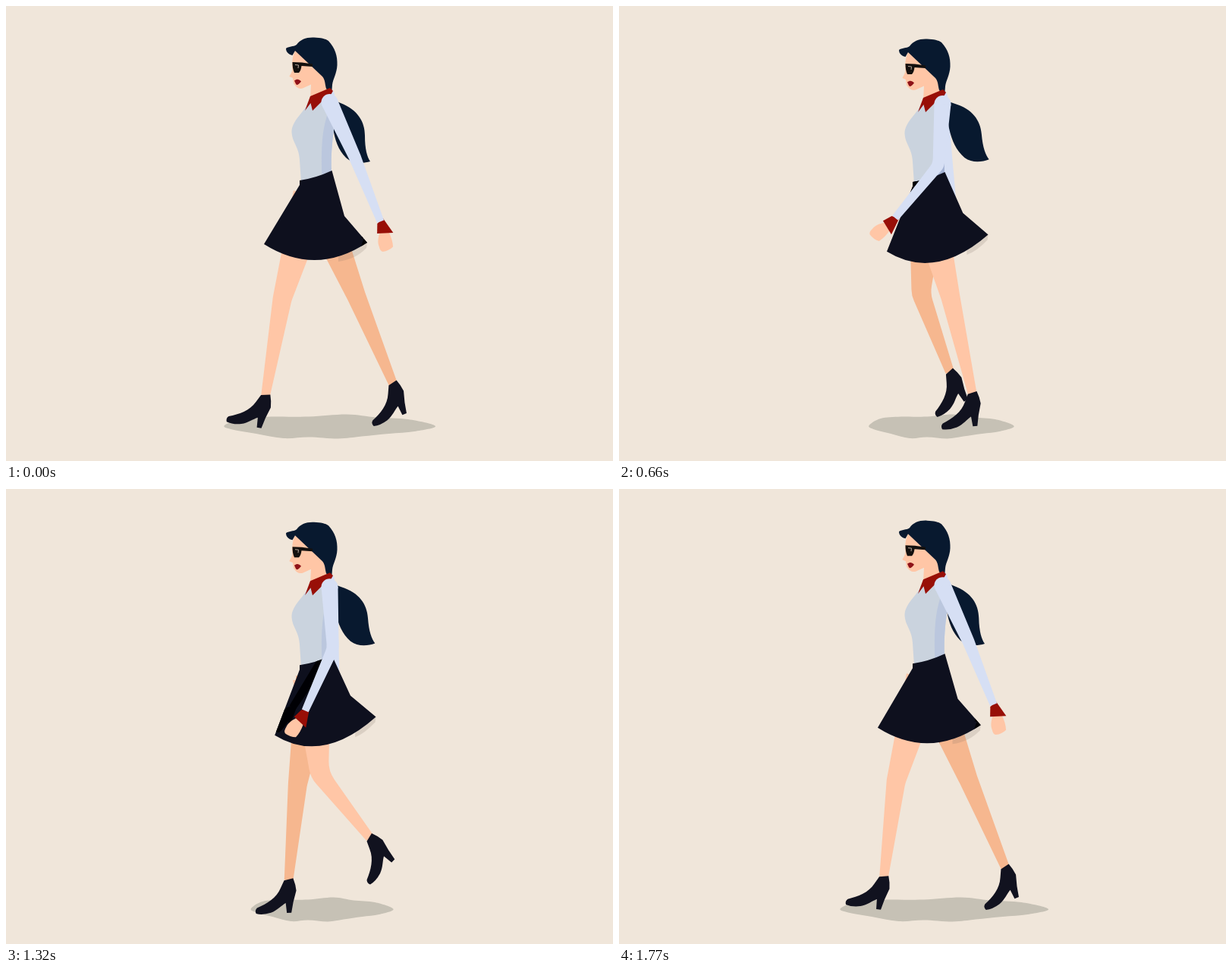
Animation of 800x600 px, one loop 1800 ms. Source, as an HTML page with a canvas:

```html
<!DOCTYPE html>
<html lang="en">
<head>
<meta charset="utf-8">
<title>Walk cycle</title>
<style>
html, body { margin: 0; width: 100%; height: 100%; overflow: hidden; background: #f0e6da; }
canvas { display: block; }
</style>
</head>
<body>
<canvas id="stage" width="800" height="600"></canvas>
<script>
const ctx = document.getElementById('stage').getContext('2d');
const LOOP = 1800, STEP = 30;
const C = {
  bg: '#f0e6da', ground: '#c6c1b5', skin: '#ffc6a6', farSkin: '#f6b78f', legShade: '#a87c66',
  skirt: '#0e101e', shoe: '#11121f', hair: '#08192f', shirt: '#cad3de', shirtBack: '#bbc7de',
  sleeve: '#d6dff4', sleeveShade: '#a3b2d3', red: '#980f07', lips: '#8f1218', glasses: '#14100e'
};

// Key rows: time, then values. Smooth periodic interpolation.
function track(period, keys) {
  const n = keys.length;
  const key = i => {
    const w = Math.floor(i / n);
    return [keys[i - w * n], keys[i - w * n][0] + w * period];
  };
  const slope = (i, c) => {
    const [a, ta] = key(i - 1), [b, tb] = key(i), [d, td] = key(i + 1);
    const h0 = tb - ta, h1 = td - tb;
    return ((b[c] - a[c]) / h0 * h1 + (d[c] - b[c]) / h1 * h0) / (h0 + h1);
  };
  return time => {
    const t = time % period;
    let i = n - 1;
    while (keys[i][0] > t) i--;
    const [a, ta] = key(i), [b, tb] = key(i + 1);
    const h = tb - ta, u = (t - ta) / h, u2 = u * u, u3 = u2 * u;
    return a.slice(1).map((v, j) =>
      v * (2 * u3 - 3 * u2 + 1) + b[j + 1] * (3 * u2 - 2 * u3) +
      h * (slope(i, j + 1) * (u3 - 2 * u2 + u) + slope(i + 1, j + 1) * (u3 - u2)));
  };
}

// knee x, y, ankle x, y, foot angle
const nearLeg = track(LOOP, [
  [0, 364, 386.5, 342, 514, 10], [120, 356, 388, 325, 519, 12], [240, 364, 392, 339, 517, 0],
  [480, 408, 384, 412, 514.5, 0], [700, 442, 384, 476, 509, -9], [870, 456, 380, 510, 492, -29],
  [990, 449, 377, 519, 467, -46], [1110, 438, 373, 511, 452, -54], [1290, 417, 376, 487, 457, -49],
  [1500, 391, 379, 421, 488, -25], [1650, 373, 383, 379, 505, -4], [1770, 365, 386, 349, 512, 8]
]);
const farLeg = track(LOOP, [
  [0, 461.5, 382, 510, 498, -22], [120, 455, 378, 519, 477, -37], [240, 448, 373, 517, 459, -47],
  [360, 437, 374, 511, 452, -53], [480, 424, 378, 497, 456, -52], [690, 394, 381, 426, 487, -26],
  [780, 383, 385, 399, 498, -10], [870, 376, 388, 375, 505, -2], [990, 368, 390, 347, 514, 10],
  [1110, 365, 392, 332, 519, 14.5], [1200, 368, 392, 340, 518, 3], [1500, 421, 386, 440, 512, -2],
  [1640, 447, 384, 482, 509, -8], [1770, 460, 382, 509, 499, -22]
]);
// upper arm angle, forearm angle (from straight down)
const nearArm = track(LOOP, [
  [0, 24.7, 21.7], [240, 20, 13.7], [480, 4.8, -21.6], [870, -10, -50], [960, -10.8, -51],
  [1110, -10.6, -46], [1500, 16.6, -1.8], [1770, 24.7, 21.7]
]);
const farArm = track(LOOP, [
  [0, -1, -10], [480, 3, -4], [870, 10, 18], [960, 10.3, 18], [1110, 9, 13.6], [1500, 3, -5]
]);
const skirtSway = track(900, [[0, 0], [210, .25], [240, .3], [480, 1], [600, .95], [870, .06]]);
const hairSway = track(900, [[0, 0], [210, .05], [240, .2], [480, .9], [600, 1], [870, .25]]);
const groundEnds = track(900, [
  [0, 288, 566], [90, 272, 569], [210, 258, 564], [240, 259, 558], [480, 338, 503],
  [600, 336, 510], [870, 292, 566]
]);

const shapes = {
  ponytail: new Path2D('M428 122 L441 128 C464 137 473 153 473 171 C473 189 476 199 480 205 C470 208 457 208 448 200 C438 190 433 176 431 160 Z'),
  hair: new Path2D('M369 56 C372 53 379 54 383 51 C388 44 396 41 406 41.500 C415 42 421 43 425 46 C434 56 437 66 436.500 78 C436 89 431 96 430 104 L429 116 L422 109 C420 102 421 98 417 93 L381 59 L377.500 65 C373 64 369 61 369 56 Z'),
  face: new Path2D('M382 57 C377 66 377 74 377.500 83 C377 88 374 91 373.500 93 L378 95 L379 102 C382 107 386 110 391 108.500 L402 103.500 L401 122 L424 113 L422 80 Z'),
  lips: new Path2D('M380 98.500 C383 96 386 96 389 99.500 C387 102 385 104 383 104 C381 102 381 100 380 98.500 Z'),
  glasses: new Path2D('M377.500 74 L390 74.500 L404 76.500 L404 80 L389.500 79 C389 83 388 86 386 88 L380 88 C378 84 377.500 79 377.500 74 Z'),
  glint: new Path2D('M381 77.500 L385.500 78 L385 82'),
  torso: new Path2D('M398 127 C393 141 377 150 376.500 166 C377 180 386 185 387 203 L389 233 L429 220 C428 195 430 180 432 163 L437 124 L422 114 Z'),
  torsoBack: new Path2D('M424 142 C417 162 415 185 416.500 224 L429 219 C428 195 430 180 432 163 L430 140 Z'),
  collar: new Path2D('M401 119 L427 108 L431 112 L428 117 L418 124 L404 138 L401.500 128 L394 138 Z'),
  shoe: new Path2D('M-6 0 L6 -2.500 Q9 6 9.500 14 L5 29 L2 43 L-4 43 L-5 30 C-11 33 -16 39 -25 42 Q-36 45 -44.500 42.500 Q-46.500 38 -43 35 C-30 30 -17 23 -11 10 Z'),
  cuff: new Path2D('M-5 1 L4.500 -3 L10 20 L-10 13 Z'),
  hand: new Path2D('M-7 14 C-11 19 -14 24 -14 30 Q-15 36 -12 38 Q-4 40 3 37 Q6 28 5 17 Z')
};

const groundShape = [
  [0, 553], [.08, 544], [.22, 541.5], [.4, 541.5], [.58, 538.5], [.72, 542.5], [.87, 545], [1, 554],
  [.9, 561], [.78, 564], [.65, 567.5], [.54, 570.5], [.4, 568.5], [.28, 570], [.15, 564], [.03, 558]
];

function fill(path, color) {
  ctx.fillStyle = color;
  ctx.fill(path);
}

function placed(x, y, deg, draw) {
  ctx.save();
  ctx.translate(x, y);
  ctx.rotate(deg * Math.PI / 180);
  draw();
  ctx.restore();
}

function clipped(path, draw) {
  ctx.save();
  ctx.clip(path);
  draw();
  ctx.restore();
}

// Closed smooth curve through points
function blob(pts) {
  const p = new Path2D(), n = pts.length, at = i => pts[(i + n) % n];
  p.moveTo(...pts[0]);
  for (let i = 0; i < n; i++) {
    const a = at(i - 1), b = at(i), c = at(i + 1), d = at(i + 2);
    p.bezierCurveTo(b[0] + (c[0] - a[0]) / 6, b[1] + (c[1] - a[1]) / 6,
      c[0] - (d[0] - b[0]) / 6, c[1] - (d[1] - b[1]) / 6, c[0], c[1]);
  }
  return p;
}

// Tapered two-part limb; w holds half widths at a, b and c
function limb(a, b, c, w, round) {
  const side = (p, from, to, r) => {
    const dx = to[0] - from[0], dy = to[1] - from[1], k = r / Math.hypot(dx, dy);
    return [p[0] - dy * k, p[1] + dx * k];
  };
  const pair = (p, from, to, r) => [side(p, from, to, r), side(p, from, to, -r)];
  const [af, ab] = pair(a, a, b, w[0]);
  const [bf, bb] = pair(b, a, c, w[1]);
  const [cf, cb] = pair(c, b, c, w[2]);
  const p = new Path2D();
  p.moveTo(...af);
  p.arcTo(...bf, ...cf, round);
  p.lineTo(...cf);
  p.lineTo(...cb);
  p.arcTo(...bb, ...ab, round);
  p.lineTo(...ab);
  p.closePath();
  return p;
}

function legPath(hipX, k) {
  return limb([hipX, 250], [k[0], k[1]], [k[2], k[3]], [25, 12.5, 5.8], 40);
}

function shoe(k) {
  placed(k[2], k[3], k[4], () => fill(shapes.shoe, C.shoe));
}

function arm(x, y, up, fore, tint) {
  const reach = (p, len, deg) => {
    const r = deg * Math.PI / 180;
    return [p[0] + len * Math.sin(r), p[1] + len * Math.cos(r)];
  };
  const s = [x, y], e = reach(s, 81, up), w = reach(e, 90, fore);
  placed(w[0], w[1], -fore, () => {
    fill(shapes.hand, tint || C.skin);
    fill(shapes.cuff, tint || C.red);
  });
  const cap = new Path2D();
  cap.arc(x, y, 11, 0, 7);
  fill(cap, tint || C.sleeve);
  fill(limb(s, e, w, [11, 8, 4.8], 18), tint || C.sleeve);
}

function skirtPath(k) {
  const p = new Path2D(), b = 2.5 * k;
  p.moveTo(387, 230 + b);
  p.quadraticCurveTo(408, 227 + b, 429.5, 217 + b);
  p.lineTo(446 + 9 * k, 277 - 5 * k);
  p.lineTo(476 + 13 * k, 312 - 13 * k);
  p.quadraticCurveTo(408 + 10 * k, 357 + 7 * k, 340 + 16 * k, 314 + 12 * k);
  p.lineTo(387, 236 + b);
  p.closePath();
  return p;
}

function hemShade(k) {
  const p = new Path2D(), x = 476 + 13 * k, y = 312 - 13 * k;
  p.moveTo(x, y);
  p.lineTo(x - 1, y + 7);
  p.quadraticCurveTo(x - 15, y + 22, x - 38 + 12 * k, y + 25 + 2 * k);
  p.lineTo(x - 38 + 12 * k, y + 17);
  p.closePath();
  return p;
}

function draw(t) {
  const near = nearLeg(t), far = farLeg(t);
  const [up, fore] = nearArm(t), [farUp, farFore] = farArm(t);
  const [k] = skirtSway(t), [sway] = hairSway(t), [left, right] = groundEnds(t);
  const bob = 2.5 * k;
  const lifted = paint => placed(0, bob, 0, paint);

  ctx.fillStyle = C.bg;
  ctx.fillRect(0, 0, 800, 600);
  fill(blob(groundShape.map(([u, y]) => [left + u * (right - left), y])), C.ground);

  lifted(() => {
    arm(422, 118, farUp, farFore);
    placed(428, 112, -5 * sway, () => {
      ctx.translate(-428, -112);
      fill(shapes.ponytail, C.hair);
    });
  });

  const farPath = legPath(407, far), nearPath = legPath(403, near);
  fill(farPath, C.farSkin);
  clipped(farPath, () => {
    ctx.translate(25, 0);
    fill(nearPath, C.legShade);
  });
  shoe(far);
  fill(nearPath, C.skin);
  shoe(near);
  fill(hemShade(k), 'rgba(120,105,95,.18)');

  lifted(() => {
    fill(shapes.torso, C.shirt);
    fill(shapes.torsoBack, C.shirtBack);
    clipped(shapes.torso, () => arm(436, 132, up, fore, C.sleeveShade));
  });

  const skirt = skirtPath(k);
  fill(skirt, C.skirt);
  clipped(skirt, () => arm(422, 130 + bob, up, fore - 9, '#000004'));

  lifted(() => {
    fill(shapes.face, C.skin);
    fill(shapes.hair, C.hair);
    fill(shapes.lips, C.lips);
    fill(shapes.glasses, C.glasses);
    ctx.strokeStyle = '#b5a59a';
    ctx.lineWidth = 1;
    ctx.stroke(shapes.glint);
    fill(shapes.collar, C.red);
    arm(426.5, 127, up, fore);
  });
}

function frame() {
  const t = performance.now() % LOOP;
  draw(Math.floor(t / STEP) * STEP);
  requestAnimationFrame(frame);
}
frame();
</script>
</body>
</html>
```
